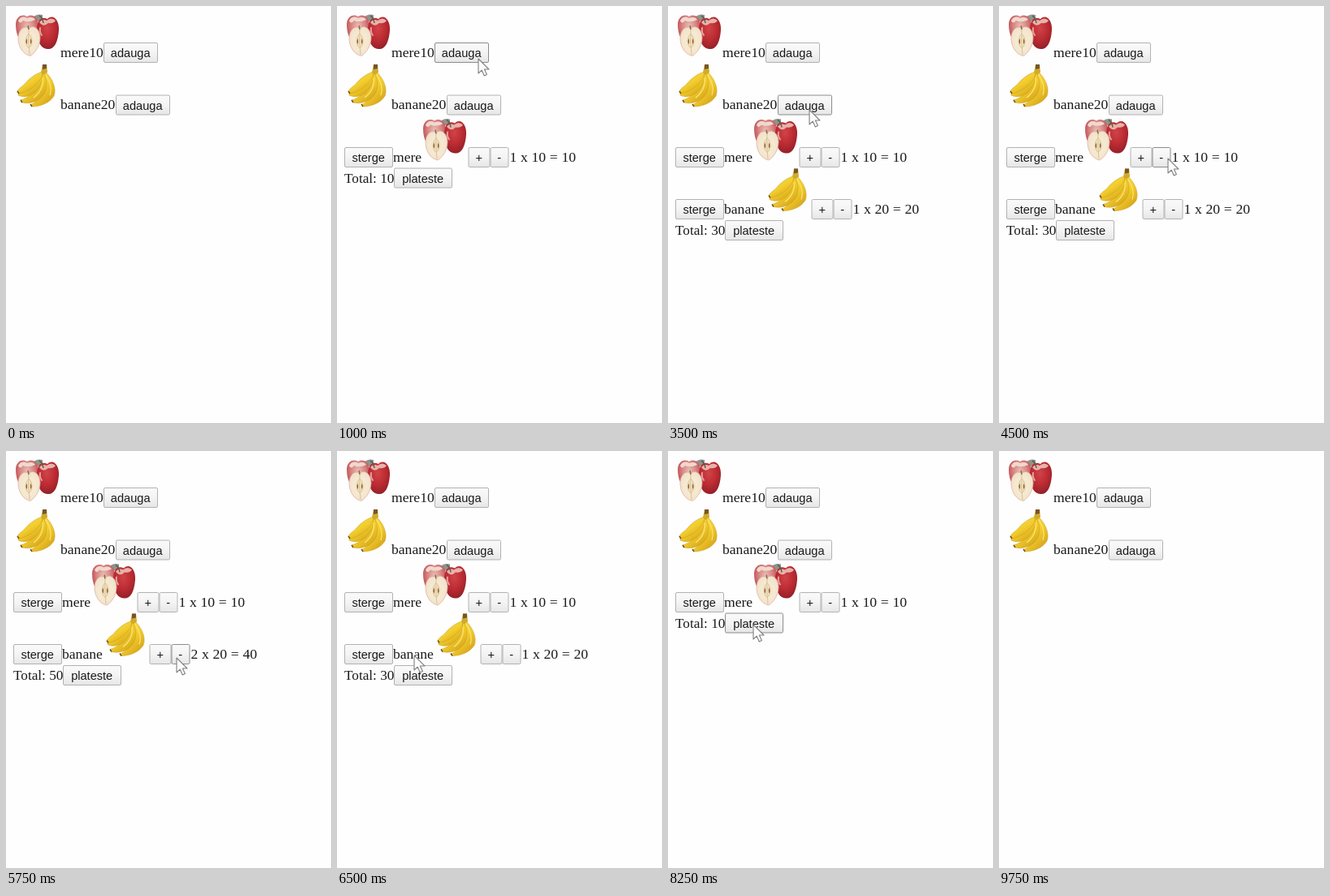
Animation of 400x514 px, one loop 10000 ms. Source, as an HTML page:

```html
<!DOCTYPE html>
<html lang="ro">
<head>
<meta charset="utf-8">
<title>Cos de fructe</title>
<style>
html, body { margin: 0; width: 100%; height: 100%; overflow: hidden; background: #fefefe; }
svg { display: block; width: 400px; height: 514px; }
.label { font: 17.6px "Liberation Serif", "Times New Roman", serif; fill: #1a1a1a; }
.sum { word-spacing: .3px; }
.total { font-size: 17.2px; }
.btn { font: 14.6px "Liberation Sans", Arial, sans-serif; fill: #1a1a1a; text-anchor: middle; }
</style>
</head>
<body>
<svg viewBox="0 0 400 514">
  <defs>
    <linearGradient id="face" x2="0" y2="1">
      <stop offset="0" stop-color="#fafafa"/><stop offset=".5" stop-color="#f4f4f4"/><stop offset="1" stop-color="#e6e6e6"/>
    </linearGradient>
    <radialGradient id="red" cx=".45" cy=".35" r=".65">
      <stop offset="0" stop-color="#d04448"/><stop offset=".55" stop-color="#bd2c33"/><stop offset="1" stop-color="#962029"/>
    </radialGradient>
    <radialGradient id="pink" cx=".5" cy=".35" r=".6">
      <stop offset="0" stop-color="#e8bdb2"/><stop offset=".5" stop-color="#d98583"/><stop offset="1" stop-color="#b8434a"/>
    </radialGradient>
    <radialGradient id="flesh">
      <stop offset="0" stop-color="#ecd9b2"/><stop offset=".5" stop-color="#f6ead2"/><stop offset="1" stop-color="#f3e2cc"/>
    </radialGradient>
    <linearGradient id="peel" x2=".7" y2="1">
      <stop offset="0" stop-color="#fbe052"/><stop offset=".6" stop-color="#f1cc2c"/><stop offset="1" stop-color="#d5a31a"/>
    </linearGradient>
    <g id="apple">
      <path d="M33 14Q38 9 45 11L45 17L36 20Z" fill="#8d948b"/>
      <path d="M26 13C32 9 40 14 40 24C40 36 35 48 26 48C17 46 12 35 12 23C12 14 19 9 26 13Z" fill="url(#pink)"/>
      <path d="M15 18Q19 11 26 15Q33 12 36 17Q27 21 21 18Q17 23 15 18Z" fill="#f0d8cf"/>
      <path d="M51 16C58 9 66 18 65 30C64 45 59 54 51 53C43 53 38 43 38 30C38 18 43 12 51 16Z" fill="url(#red)"/>
      <path d="M41 20Q45 15 50 18Q56 13 61 18Q58 22 52 21Q46 27 41 20Z" fill="#e6b3aa"/>
      <path d="M42 27Q41 32 44 36" fill="none" stroke="#e8a29d" stroke-width="2" stroke-linecap="round"/>
      <path d="M41 12Q45 14 46 21" fill="none" stroke="#59604f" stroke-width="1.5"/>
      <path d="M28 28C33 22 42 28 42 39C42 49 36 58 30 61.5C21 60 15 50 15 40C15 30 22 23 28 28Z" fill="url(#flesh)" stroke="#dfb3a0" stroke-width=".8"/>
      <path d="M28 28Q27 45 29 60M28 34C23 39 23 48 28 52C33 48 33 39 28 34" fill="none" stroke="#d3b98a" stroke-width=".8"/>
      <path d="M26 40Q23 44 26 47ZM30 40Q33 44 30 47Z" fill="#8a5a38"/>
      <path d="M28 29L27 24" stroke="#80664a" stroke-width="1.3"/>
    </g>
    <g id="banana" stroke="#c9981c" stroke-width=".5" stroke-linejoin="round">
      <path d="M47 80C56 87 63 101 59 111C54 119 43 124 32 124L30 122C41 116 47 109 46 98Z" fill="url(#peel)"/>
      <path d="M45 81C52 92 51 104 45 111C38 119 27 121 20 119L18 116C29 113 36 105 39 94Z" fill="url(#peel)"/>
      <path d="M44 82C46 91 42 101 35 107C28 112 21 113 15 110L15 107C23 104 30 98 34 90Z" fill="url(#peel)"/>
      <path d="M45 81C37 83 29 89 24 95C20 100 15 101 14 106L17 108C28 105 39 98 44 87Z" fill="url(#peel)"/>
      <path d="M45 72L50 72L51 82L46 85L43 82Z" fill="#cfab2c" stroke="none"/>
      <path d="M45 72L50 72L50 77L45 78Z" fill="#77552a" stroke="none"/>
      <path d="M14 105l2 3M18 116l2 3M30 121l2 3" stroke="#6b5020" stroke-width="1.4"/>
      <path d="M49 85Q58 99 54 110M45 88Q47 103 34 113" fill="none" stroke="#fbe576" stroke-width="1.2"/>
    </g>
  </defs>
  <g id="page"></g>
  <path id="arrow" d="M0 0V18L4.2 14.2L7.3 21L10.4 19.6L7.4 13H13Z" fill="#fcfcfc" stroke="#808080" stroke-width="1.1" stroke-linejoin="round"/>
</svg>
<script>
const LOOP = 10000, STEP = 250;
const page = document.getElementById("page");
const arrow = document.getElementById("arrow");

// Pointer stops: time, then x and y; a bare time hides it.
const stops = [
  [0], [250, 262, 150], [500, 205, 95], [750, 174, 65], [1500],
  [3000, 376, 158], [3250, 258, 140], [3500, 174, 128], [3750, 175, 156],
  [4000, 176, 190], [4500, 208, 188], [4750, 205, 222], [5000, 192, 254],
  [5750, 210, 255], [6250, 160, 256], [6500, 95, 252], [6750, 46, 248],
  [7500, 46, 231], [7750, 76, 222], [8000, 105, 214], [8500]
];

const within = (t, from, to) => t >= from && t < to;

function basket(t) {
  return {
    apples: within(t, 750, 9500) ? (within(t, 4250, 4500) ? 2 : 1) : 0,
    bananas: within(t, 3500, 7000) ? (within(t, 5250, 6000) ? 2 : 1) : 0
  };
}

const label = (x, y, s, extra = "") =>
  `<text class="label ${extra}" x="${x}" y="${y}">${s}</text>`;

const fruit = (id, dx, dy) => `<use href="#${id}" x="${dx}" y="${dy}"/>`;

function button(x, y, w, s, [, px, py]) {
  const over = within(px, x, x + w) && within(py, y, y + 25);
  return `<rect x="${x + .5}" y="${y + .5}" width="${w - 1}" height="24" rx="1.5"
    fill="url(#face)" stroke="${over ? "#8c8c8c" : "#b2b2b2"}"/>
    <text class="btn" x="${x + w / 2 - .3}" y="${y + 18}">${s}</text>`;
}

function cartRow(y, name, id, dx, plusX, count, price, at) {
  return button(9, y, 60, "sterge", at) + label(69, y + 18, name) +
    fruit(id, dx, 128.5) +
    button(plusX, y, 27, "+", at) + button(plusX + 27, y, 23, "-", at) +
    label(plusX + 51, y + 18, `${count} x ${price} = ${count * price}`, "sum");
}

function draw(t) {
  const at = stops.filter(s => s[0] <= t).pop();
  const { apples, bananas } = basket(t);
  let out = fruit("apple", 0, 0) + label(67, 63, "mere10") + button(120, 45, 67, "adauga", at) +
    fruit("banana", 0, 0) + label(67, 127, "banane20") + button(135, 109.5, 67, "adauga", at);
  if (apples) out += cartRow(174, "mere", "apple", 94, 161.5, apples, 10, at);
  if (bananas) out += cartRow(238, "banane", "banana", 110, 176.5, bananas, 20, at);
  if (apples || bananas) {
    const y = bananas ? 264 : 199.5;
    out += label(9, y + 18, `Total: ${apples * 10 + bananas * 20}`, "total") + button(70, y, 72, "plateste", at);
  }
  page.innerHTML = out;
  arrow.style.display = at.length > 1 ? "" : "none";
  if (at.length > 1) arrow.setAttribute("transform", `translate(${at[1]} ${at[2]})`);
}

const start = performance.now();
let shown = -1;
function tick(now) {
  const t = Math.floor(Math.max(0, now - start) % LOOP / STEP) * STEP;
  if (t !== shown) draw(shown = t);
  requestAnimationFrame(tick);
}
tick(start);
</script>
</body>
</html>
```
